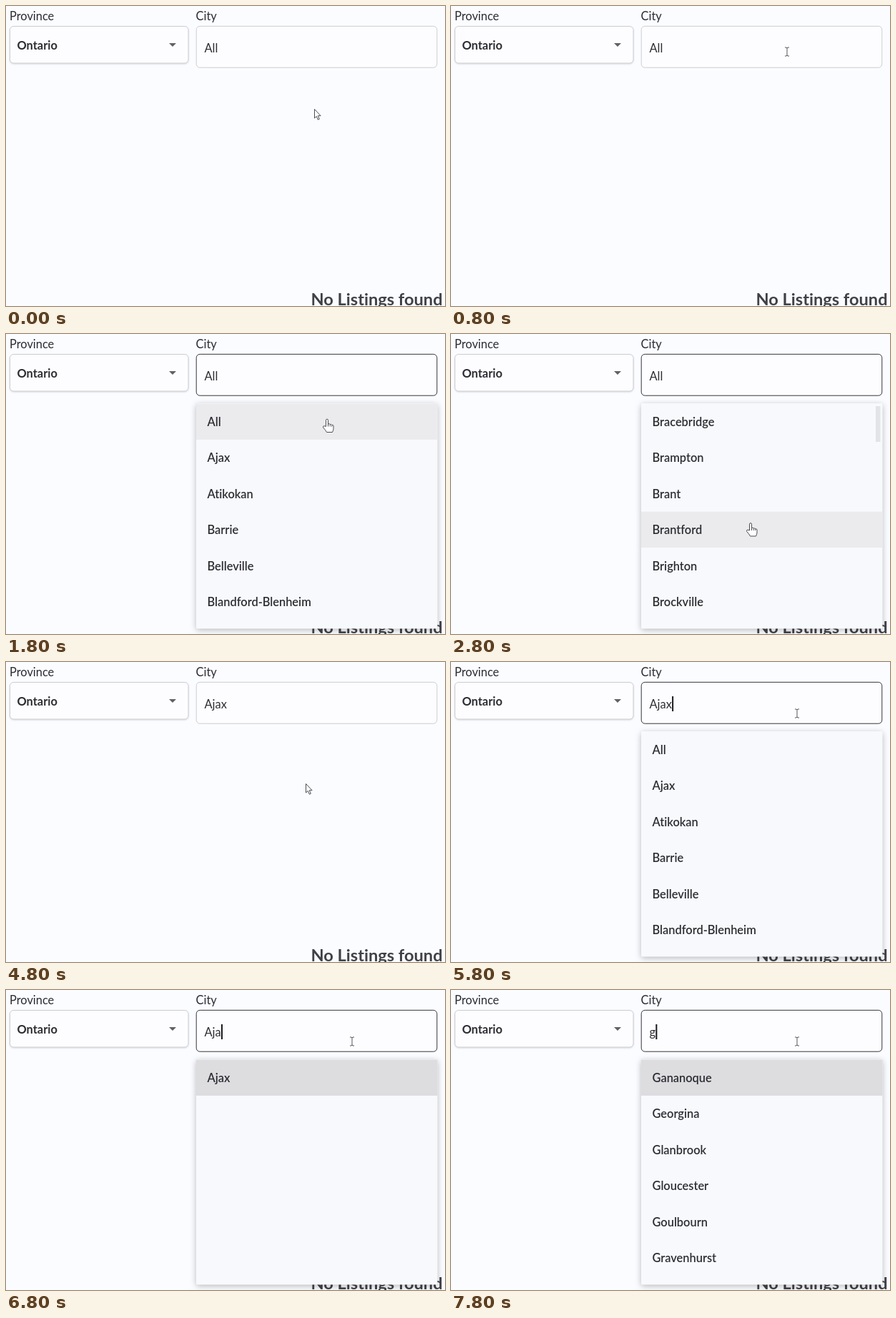
An HTML page that plays this animation: 614x420 px, repeating every 8000 ms.

```html
<!DOCTYPE html>
<html lang="en">
<head>
<meta charset="utf-8">
<title>City picker</title>
<style>
  html, body { margin: 0; width: 100%; height: 100%; overflow: hidden; background: #fbfcff; }
  svg { display: block; }
  text { font: 400 16.4px Lato, sans-serif; font-variant-ligatures: none; fill: #2c2d32; }
  .strong { font-weight: 700; }
  .item { font-weight: 600; }
  .notice { font-size: 23.6px; font-weight: 700; fill: #404147; }
  .box { fill: #fdfdff; stroke: #cccdd2; }
  .focus .box { stroke: #34353a; }
  .soft { filter: drop-shadow(0 1px 1px #0002); }
  .panel { fill: #f8f9fc; filter: drop-shadow(0 2px 4px #0004); }
  .pointer { fill: #fff; stroke: #4c4d52; stroke-linejoin: round; }
</style>
</head>
<body>
<svg width="614" height="420" viewBox="0 0 614 420">
  <text x="5" y="19.5">Province</text>
  <text x="265.5" y="19.5">City</text>
  <g class="soft"><rect class="box" x="5.5" y="28.5" width="249.5" height="51.5" rx="5"/></g>
  <text class="strong" x="15.5" y="61">Ontario</text>
  <path d="M228 52h10l-5 5z" fill="#606166"/>
  <text class="notice" x="426.5" y="419">No Listings found</text>

  <g id="field">
    <rect class="box" x="266.2" y="28.3" width="336.6" height="57.9" rx="5"/>
    <text id="value" x="277.5" y="64.5"></text>
    <rect id="caret" y="48" width="2" height="21" fill="#17181b"/>
  </g>

  <g id="menu">
    <rect class="panel" x="266" y="97" width="337.5" height="315.5" rx="2"/>
    <rect id="hover" x="266" width="337.5" height="50.4"/>
    <rect id="thumb" x="594" y="97" width="6.5" height="50" fill="#e3e4e8"/>
    <g id="items"></g>
  </g>

  <path id="arrow" class="pointer" d="M.5 .5V13l2.8-2.6 2 4.8 2-.9-2-4.6h3.8z"/>
  <g id="hand" class="pointer">
    <path d="M-1.5 10V1.2a1.5 1.5 0 0 1 3 0V6.5q2-1 2.7.6 2-.8 2.6.8 2-.5 2.2 1.2V13q0 2-1.5 5H-.5Q-2 15-5.3 11.5q-.8-2.2 1.3-2.4z"/>
    <path d="M1.5 6.5V10M4.2 7.3V10M6.7 8.2v2" fill="none"/>
  </g>
  <path id="beam" d="M-3-6h2l1 1 1-1h2M-3 6h2l1-1 1 1h2M0-5V5" fill="none" stroke="#55565b"/>
</svg>
<script>
const $ = id => document.getElementById(id);
const LOOP = 8000, ROW = 50.4;
const start = ["All", "Ajax", "Atikokan", "Barrie", "Belleville", "Blandford-Blenheim"];
const lower = ["Bracebridge", "Brampton", "Brant", "Brantford", "Brighton", "Brockville"];
const match = ["Gananoque", "Georgina", "Glanbrook", "Gloucester", "Goulbourn", "Gravenhurst"];
const light = "#ebebee", dark = "#dddde0";

const steps = [
  { at: 0, value: "All", cursor: ["arrow", 431, 144] },
  { at: 800, value: "All", cursor: ["beam", 470, 64] },
  { at: 1800, value: "All", focus: true, list: start, row: 0, tint: light, cursor: ["hand", 449, 119.5] },
  { at: 2800, value: "All", focus: true, list: lower, row: 3, tint: light, thumb: 101, cursor: ["hand", 419, 265] },
  { at: 3800, value: "All", focus: true, list: start, row: 3, tint: light, thumb: 97, cursor: ["hand", 419, 265] },
  { at: 4800, value: "Ajax", cursor: ["arrow", 419, 170] },
  { at: 5800, value: "Ajax", focus: true, caret: true, list: start, cursor: ["beam", 484, 72] },
  { at: 6800, value: "Aja", focus: true, caret: true, list: ["Ajax"], row: 0, tint: dark, cursor: ["beam", 484, 72] },
  { at: 7800, value: "g", focus: true, caret: true, list: match, row: 0, tint: dark, cursor: ["beam", 484, 72] }
];

const show = (el, on) => { el.style.display = on ? "" : "none"; };

function render(s) {
  $("field").setAttribute("class", s.focus ? "focus" : "");
  $("value").textContent = s.value;
  $("caret").setAttribute("x", 277.5 + $("value").getComputedTextLength() + 0.3);
  show($("caret"), s.caret);

  show($("menu"), s.list);
  $("items").replaceChildren(...(s.list || []).map((name, i) => {
    const t = document.createElementNS("http://www.w3.org/2000/svg", "text");
    t.setAttribute("class", "item");
    t.setAttribute("x", 281.5);
    t.setAttribute("y", 129 + i * ROW);
    t.textContent = name;
    return t;
  }));
  show($("hover"), s.row !== undefined);
  $("hover").setAttribute("y", 97.5 + (s.row || 0) * ROW);
  $("hover").setAttribute("fill", s.tint || "none");
  show($("thumb"), s.thumb);
  $("thumb").setAttribute("y", s.thumb || 97);

  const [kind, x, y] = s.cursor;
  for (const id of ["arrow", "hand", "beam"]) show($(id), id === kind);
  $(kind).setAttribute("transform", `translate(${x} ${y})`);
}

let current;
function tick() {
  const t = performance.now() % LOOP;
  const step = steps.findLast(s => s.at <= t);
  if (step !== current) render(current = step);
  requestAnimationFrame(tick);
}
tick();
</script>
</body>
</html>
```
